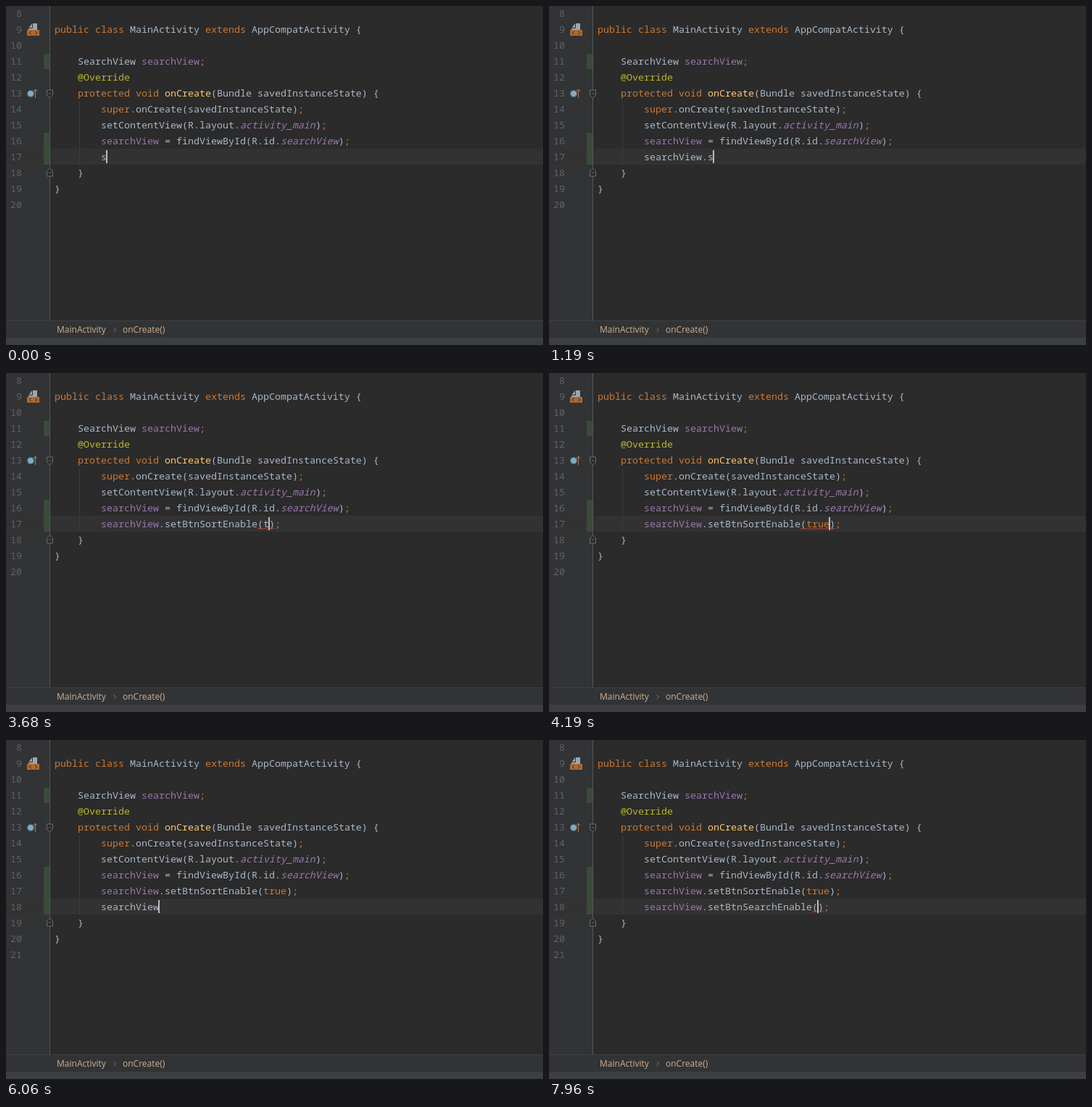
An HTML page that plays this animation: 741 by 468 pixels, repeating every 8000 ms.

```html
<!DOCTYPE html>
<html lang="en">
<head>
<meta charset="utf-8">
<title>Code completion</title>
<style>
html, body { margin: 0; width: 100%; height: 100%; overflow: hidden; background: #2b2b2b; }
svg { display: block; }
text { font: 13.333px "Noto Sans Mono", monospace; fill: #a9b7c6; white-space: pre; }
text.num { fill: #606366; text-anchor: end; }
text.crumb { font: 12px "Open Sans", sans-serif; fill: #d0b090; }
text.item { fill: #929698; }
text.type { fill: #929698; text-anchor: end; }
text.doc { font-size: 11.7px; fill: #b4b8ba; text-anchor: end; }
text.letter { font-size: 10.5px; fill: #302c2e; text-anchor: middle; }
.k { fill: #cc7832; }
.f { fill: #9876aa; }
.i { fill: #9876aa; font-style: italic; }
.a { fill: #bbb529; }
.d { fill: #ffc66d; }
.l { fill: #589df6; }
.b { font-weight: bold; fill: #b0b4b6; }
.hit { fill: #b06fae; }
</style>
</head>
<body>
<svg id="stage" width="741" height="468"></svg>
<script>
const LOOP = 8000, CHAR = 8, LEFT = 67, INDENT = 131;

const code = [
  '', '[k|public class] MainActivity [k|extends] AppCompatActivity {', '',
  '    SearchView [f|searchView][k|;]', '    [a|@Override]',
  '    [k|protected void] [d|onCreate](Bundle savedInstanceState) {',
  '        [k|super].onCreate(savedInstanceState)[k|;]',
  '        setContentView(R.layout.[i|activity_main])[k|;]',
  '        [f|searchView] = findViewById(R.id.[i|searchView])[k|;]'
];

// Entries: "kind:*name(params)|type"; a star marks bold, the default is a void method
const own = ['*setBtnSortEnable(Boolean status)', '*setBtnSearchEnable(Boolean status)',
  '*setListener(ISearchView iSearchView)'];
const a11y = ['setAccessibilityDelegate(AccessibilityDelegate de…', 'setAccessibilityHeading(boolean isHeading)'];
const scrolls = ['saveHierarchyState(SparseArray&lt;Parcelable> contai…',
  'scheduleDrawable(Drawable who, Runnable what, lon…', 'scheduleLayoutAnimation()',
  'scrollBy(int x, int y)', 'scrollTo(int x, int y)', 'sendAccessibilityEvent(int eventType)',
  'sendAccessibilityEventUnchecked(AccessibilityEven…'];
const sends = ['sendBroadcast(Intent intent)', 'sendBroadcast(Intent intent, String receiverPermi…',
  'sendBroadcastAsUser(Intent intent, UserHandle use…', 'sendBroadcastAsUser(Intent intent, UserHandle use…',
  'sendOrderedBroadcast(Intent intent, String receiv…', 'sendOrderedBroadcast(Intent intent, String receiv…',
  'sendOrderedBroadcastAsUser(Intent intent, UserHan…'];
const setters = ['setActionBar(Toolbar toolbar)', 'setContentTransitionManager(TransitionManager tm)',
  'setDefaultKeyMode(int mode)'];
const field = 'f:*searchView|SearchView';

const lists = {
  s: { x: 94, hit: 's', items: ['p:savedInstanceState|Bundle', field, ...sends, ...setters] },
  se: { x: 94, hit: 'se', items: [field, ...sends, ...setters, 'setElevation(float elevation)'] },
  sea: { x: 94, hit: 'sea', items: [field, 'onSearchRequested()|boolean',
    'onSearchRequested(SearchEvent searchEvent)|boolean', 'startSearch(String initialQuery, boolean sele…',
    'triggerSearch(String query, Bundle appSearchData)', 'getSearchEvent()|SearchEvent'] },
  all: { x: 182, hit: '', items: [...own, 'addChildrenForAccessibility(ArrayList&lt;View> outCh…',
    'addFocusables(ArrayList&lt;View> views, int direction)', 'addTouchables(ArrayList&lt;View> views)',
    'addView(View child)', 'addView(View child, int index)', 'bringChildToFront(View child)',
    'bringToFront()', 'buildDrawingCache()', 'buildLayer()'] },
  dotS: { x: 182, hit: 's', items: [...own, ...scrolls, ...a11y] },
  dotSet: { x: 182, hit: 'set', dim: true, items: [...own, ...a11y, 'setAccessibilityLiveRegion(int mode)',
    'setAccessibilityPaneTitle(CharSequence accessibil…', 'setAccessibilityTraversalAfter(int afterId)',
    'setAccessibilityTraversalBefore(int beforeId)', 'setActivated(boolean activated)',
    'setAddStatesFromChildren(boolean addsStates)', 'setAlpha(float alpha)'] },
  t: { x: 318, hit: 't', height: 247, items: ['k:true|', 'k:this|MainActivity', 'takeKeyEvents(boolean get)',
    'triggerSearch(String query, Bundle appSear…', 'getTitle()|CharSequence', 'getTaskId()|int',
    'getTheme()|Theme', 'getTitleColor()|int', 'isTaskRoot()|boolean', 'toString()|String',
    'setTitle(int titleId)', 'setTheme(int resid)', 'setTurnScreenOn(boolean on)'] }
};
lists.tr = { ...lists.t, hit: 'tr', height: 232 };

const SORT = 'searchView.setBtnSortEnable(', SEARCH = 'searchView.setBtnSearchEnable(';
// Each step changes part of the editor state; "back" counts characters after the caret
const steps = [
  [0, { row: 17, text: 's', list: '', pick: 0, caret: 1, back: 0, doc: 0, known: 0, wave: '', match: 0 }],
  [200, { list: 's' }],
  [320, { text: 'se' }], [350, { list: 'se' }],
  [460, { text: 'sea' }], [490, { list: 'sea' }],
  [770, { text: 'searchView', list: '' }],
  [980, { text: 'searchView.' }],
  [1190, { text: 'searchView.s' }],
  [1360, { list: 'dotS' }],
  [1400, { text: 'searchView.se' }],
  [1470, { text: 'searchView.set' }], [1500, { list: 'dotSet' }],
  [2020, { caret: 0 }], [2330, { doc: 0.7 }], [2360, { doc: 1 }], [2510, { caret: 1 }],
  [3000, { text: SORT + ');', back: 2, list: '' }], [3070, { doc: 0 }],
  [3340, { known: 1, wave: '()' }],
  [3680, { text: SORT + 't);', wave: '(t)' }],
  [3850, { list: 't' }], [3940, { text: SORT + 'tr);', wave: '(tr)' }], [3980, { list: 'tr' }],
  [4190, { text: SORT + 'true);', list: '' }],
  [4460, { back: 1, wave: '', match: 1 }],
  [4640, { back: 0, match: 0 }],
  [4900, { row: 18, text: '', known: 0 }],
  [5100, { text: 's' }], [5200, { list: 's' }],
  [5380, { text: 'se' }], [5420, { list: 'se' }],
  [5600, { text: 'sea' }], [5670, { list: 'sea' }],
  [6060, { text: 'searchView', list: '' }],
  [6260, { text: 'searchView.' }], [6460, { list: 'all' }],
  [6660, { text: 'searchView.s' }], [6690, { list: 'dotS' }],
  [7390, { pick: 1 }],
  [7600, { list: '' }], [7640, { text: SEARCH + ');', back: 2 }],
  [7930, { known: 1 }], [7960, { wave: '()' }]
];

const mid = line => 10 + 22 * (line - 8);
const rect = (x, y, w, h, fill, more = '') =>
  `<rect x="${x}" y="${y}" width="${w}" height="${h}" fill="${fill}" ${more}/>`;
const path = (d, stroke, fill = 'none') => `<path d="${d}" stroke="${stroke}" fill="${fill}"/>`;
const text = (x, y, body, cls = '') => `<text x="${x}" y="${y}" class="${cls}">${body}</text>`;
const paint = s => s.replace(/\[(\w)\|(.*?)\]/g, '<tspan class="$1">$2</tspan>');
const line = (n, s) => text(LEFT, mid(n) + 5, paint(s));

function typed(s, known) {
  if (known) s = s.replace('searchView', '[f|searchView]').replace('(true)', '([k|true])');
  return '        ' + s.replace(';', '[k|;]');
}

function fold(y, dir) {
  const p = v => y + v * dir;
  return path(`M56.5 ${p(-5)}H64.5V${p(2)}L60.5 ${p(6)}L56.5 ${p(2)}ZM58.5 ${y}H62.5`, '#6a6c6e', '#2b2b2b');
}

function gutterIcons() {
  return path('M36 24H43V33H31V31Z', 'none', '#9aa7b0') + path('M36.5 24V30.5H31', '#313335') +
    rect(29, 33, 17, 8, '#b0692f') + path('M35 34.5L32 37L35 39.5M40 34.5L43 37L40 39.5', '#4a2e1a') +
    `<circle cx="34" cy="121" r="4.8" fill="#5a91ad"/><circle cx="34" cy="121" r="2.2" fill="none" stroke="#d5dde2"/>` +
    path('M40.5 127V115M38 118L40.5 115L43 118', '#d0703c');
}

function icon(kind, cy, dim) {
  if (kind == 'k') return '';
  const method = kind == 'm';
  const lock = dim ? '#2c2f31' : '#4f8a50';
  return `<circle cx="11" cy="${cy}" r="7" fill="${method ? '#8d5d69' : '#a67a3c'}"/>` +
    text(11, cy + 3.5, kind, 'letter') +
    (method ? rect(25, cy - 1, 6, 4, lock) + path(`M23.5 ${cy}V${cy - 3.5}H26.5V${cy - 1}`, lock)
      : `<circle cx="27" cy="${cy}" r="2.5" fill="#7d8183"/>`);
}

function popup({ x, hit, items, dim, height = 232 }, y, pick) {
  const long = items.length > 6, h = long ? height : items.length * 20 + 2;
  const rows = items.map((item, i) => {
    const [sig, type = 'void'] = item.split('|');
    const [, kind = 'm', star, name, rest] = sig.match(/^(?:(\w):)?(\*?)(\w+)(.*)$/);
    const at = name.toLowerCase().indexOf(hit), end = at + hit.length, cy = 11 + 20 * i;
    const label = at < 0 ? name
      : `${name.slice(0, at)}<tspan class="hit">${name.slice(at, end)}</tspan>${name.slice(end)}`;
    return (i == pick ? rect(1, cy - 10, long ? 486 : 500, 20, '#4b4f51') : '') + icon(kind, cy, dim) +
      text(37, cy + 5, (star ? `<tspan class="b">${label}</tspan>` : label) + rest, 'item') +
      text(long ? 480 : 492, cy + 5, type, 'type');
  }).join('');
  return `<svg x="${x}" y="${y}" width="502" height="${h}">` + rect(0, 0, 502, h, '#3b3e40') + rows +
    (long ? rect(492, 2, 8, 26, '#595c5e') + text(490, h - 3, 'π', 'item') : '') +
    rect(.5, .5, 501, h - 1, 'none', 'stroke="#55585a"') + '</svg>';
}

function docs(opacity) {
  return `<g opacity="${opacity}">` + rect(-1, 220.5, 180.5, 81, '#3c3f41', 'stroke="#5a5d5f"') +
    text(115, 241, '<tspan class="l">com.example.searchview.SearchView</tspan>', 'doc') +
    text(158, 257, 'void <tspan class="b">setBtnSortEnable</tspan>(<tspan class="l">Boolean</tspan> status)', 'doc') +
    path('M0 268.5H179', '#55585a') +
    '<circle cx="165" cy="287" r="3.6" fill="none" stroke="#afb1b3" stroke-width="2.6"/>' +
    '<circle cx="165" cy="287" r="5.4" fill="none" stroke="#afb1b3" stroke-width="2" stroke-dasharray="2.4 3.25"/></g>';
}

function wave(from, to, y) {
  let d = `M${from} ${y + 2}`;
  for (let x = from + 2, up = 1; x <= to; x += 2, up = !up) d += `L${x} ${up ? y : y + 2}`;
  return path(d, '#bc3f3c');
}

function draw(s) {
  const cy = mid(s.row), top = cy - 11, last = s.row + 1;
  const col = n => INDENT + n * CHAR;
  const open = s.text.indexOf('('), close = s.text.indexOf(')');
  let out = rect(0, 0, 741, 468, '#2b2b2b') + rect(0, 0, 60, 434, '#313335') +
    rect(0, top, 741, 22, '#323232') +
    rect(52, 66, 9, 21, '#384c38') + rect(52, 175, 9, top + 22 - 175, '#384c38') +
    path('M60.5 0V434', '#555759') + path(`M101.5 132V${top + 22}`, '#3a3c3d');
  for (let n = 8; n <= s.row + 3; n++) out += text(22, mid(n) + 5, n, 'num');
  out += gutterIcons() + fold(121, 1) + fold(mid(last), -1);
  code.forEach((c, i) => out += line(8 + i, c));
  if (s.row == 18) out += line(17, typed(SORT + 'true);', 1));
  if (s.match) for (const n of [open, close]) out += rect(col(n), top, CHAR, 22, '#3b514d');
  out += line(s.row, typed(s.text, s.known)) + line(last, '    }') + line(last + 1, '}');
  if (s.wave) out += wave(col(open), col(close + 1), cy + 6);
  if (s.caret) out += rect(col(s.text.length - s.back) - 1, top + 2, 2, 18, '#bbbbbb');
  out += rect(0, 434, 741, 24, '#313335') + path('M0 434.5H741', '#3e4042') + rect(0, 458, 741, 10, '#3c3f41') +
    text(70, 451, 'MainActivity', 'crumb') + path('M148.5 444L151.5 447L148.5 450', '#77797b') +
    text(161, 451, 'onCreate()', 'crumb');
  if (s.doc) out += docs(s.doc);
  if (s.list) out += popup(lists[s.list], top + 22, s.pick);
  return out;
}

const stage = document.getElementById('stage'), start = performance.now();
let shown = -1;
function frame() {
  const t = (performance.now() - start) % LOOP;
  const past = steps.filter(([at]) => at <= t);
  if (past.length != shown) {
    shown = past.length;
    stage.innerHTML = draw(Object.assign({}, ...past.map(([, change]) => change)));
  }
  requestAnimationFrame(frame);
}
frame();
</script>
</body>
</html>
```
